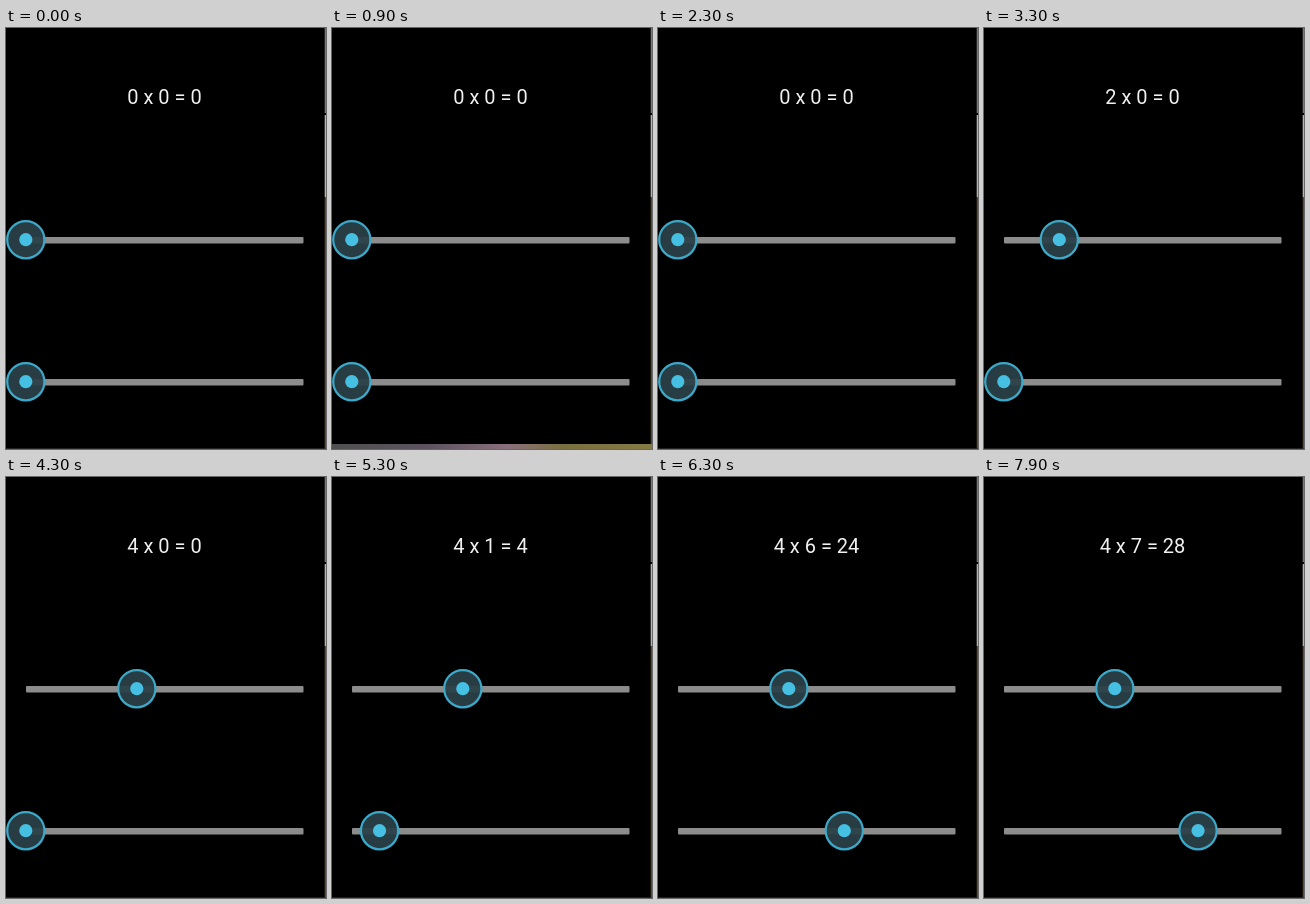
Write an HTML page that moves like this. It is 320 by 421 pixels and loops after 8000 ms.

```html
<!DOCTYPE html>
<html lang="en">
<head>
<meta charset="utf-8">
<title>Multiplication sliders</title>
<style>
  html, body { margin: 0; width: 100%; height: 100%; overflow: hidden; background: #000; }
  svg { display: block; width: 320px; height: 421px; }
  text { font: 20px Roboto, sans-serif; fill: #f0f0f0; text-anchor: middle; white-space: pre; }
  .track { fill: #8c8c8c; }
  .disc { fill: #2b4048; fill-opacity: .94; stroke: #3ba9c9; stroke-width: 2.2; }
  .dot { fill: #45bfe2; }
</style>
</head>
<body>
<svg viewBox="0 0 320 421">
  <defs>
    <linearGradient id="floor">
      <stop offset="0" stop-color="#505050"/>
      <stop offset=".3" stop-color="#5c5260"/>
      <stop offset=".55" stop-color="#8a707c"/>
      <stop offset=".72" stop-color="#79703f"/>
      <stop offset="1" stop-color="#857a42"/>
    </linearGradient>
    <g id="thumb">
      <circle class="disc" r="18.6"/>
      <circle class="dot" r="6.6"/>
    </g>
  </defs>
  <rect width="320" height="421"/>
  <g id="edge">
    <rect x="318.7" width="1.3" height="85" fill="#777"/>
    <rect x="318.7" y="87" width="1.3" height="82" fill="#b4b4b4"/>
    <rect x="318.7" y="169" width="1.3" height="252" fill="#5e4a2c"/>
    <rect x="317.5" y="85" width="2.5" height="2" fill="#000"/>
  </g>
  <rect y="420.4" width="320" height=".6" fill="#383838"/>
  <rect id="strip" width="320" height="6" fill="url(#floor)"/>
  <text id="label" x="158.5" y="76"></text>
  <rect class="track" x="20" y="209" width="277.5" height="6.5" rx="1"/>
  <rect class="track" x="20" y="351" width="277.5" height="6.5" rx="1"/>
  <use id="first" href="#thumb"/>
  <use id="second" href="#thumb"/>
</svg>
<script>
  const LOOP = 8000;
  const START = 19.8, STEP = 27.75;

  // Times at which each slider snaps one notch further
  const firstSteps = [2700, 3300, 3500, 3800];
  const secondSteps = [5300, 5500, 5700, 5900, 6000, 6200, 6600];

  const el = id => document.getElementById(id);
  const label = el('label'), strip = el('strip');
  const first = el('first'), second = el('second');

  const valueAt = (steps, t) => steps.filter(s => s <= t).length;

  function place(thumb, value, y) {
    thumb.setAttribute('transform', `translate(${START + value * STEP} ${y})`);
  }

  // The lower edge briefly uncovers the desktop beneath
  function stripHeight(t) {
    if (t < 100 || t >= 1700) return 0;
    const p = t < 900 ? (t - 100) / 800 : (1700 - t) / 800;
    return 5 * Math.sin(p * Math.PI / 2);
  }

  function draw(t) {
    const a = valueAt(firstSteps, t);
    const b = valueAt(secondSteps, t);
    label.textContent = `${a} x ${b} = ${a * b}`;
    place(first, a, 211.7);
    place(second, b, 353.7);
    strip.setAttribute('y', 421 - stripHeight(t));
  }

  const begin = performance.now();
  function tick() {
    draw((performance.now() - begin) % LOOP);
    requestAnimationFrame(tick);
  }
  tick();
</script>
</body>
</html>
```
